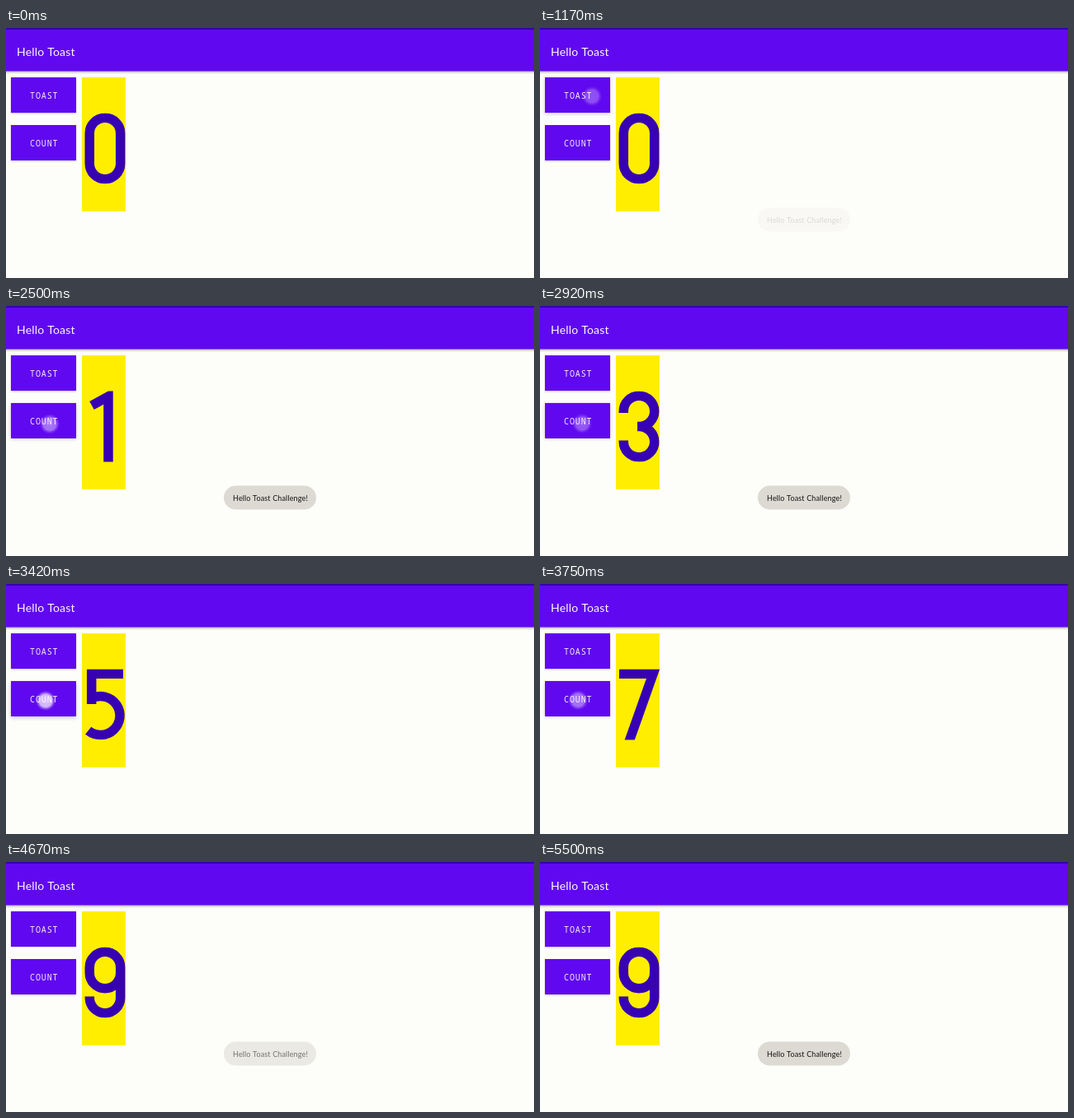
An HTML page with a canvas that plays this animation: 640x304 px, repeating every 5.66 s.

```html
<!DOCTYPE html>
<html lang="en">
<head>
<meta charset="utf-8">
<title>Hello Toast</title>
<style>
  html, body { margin: 0; width: 100%; height: 100%; overflow: hidden; background: #fdfdfa; }
  canvas { display: block; width: 640px; height: 304px; }
</style>
</head>
<body>
<canvas id="stage" width="640" height="304" aria-label="Hello Toast: a counter and a toast message"></canvas>
<script>
const ctx = document.getElementById('stage').getContext('2d');
const LOOP = 5660, STEP = 1000 / 12;
const PAPER = '#fdfdfa', PURPLE = '#6009f0', INK = '#3700b3';

// Centre lines of the counter's digits, drawn with one thick stroke
const NINE = 'M101.3 128a18.7 18.7 0 0 1 37.4 0V135a18.7 18.7 0 0 1 -37.4 0Z' +
             'M138.7 128V165a18.7 18.7 0 0 1 -37.4 0V163.5';
const DIGITS = [
  'M101.3 128a18.7 18.7 0 0 1 37.4 0V165a18.7 18.7 0 0 1 -37.4 0Z',
  'M104 121L124 110V200',
  'M101.3 130V128a18.7 18.7 0 0 1 34.2 10.4L103 183.7H144.5',
  'M101.3 130V128a18.7 18.7 0 1 1 18.7 18.6H118M118 146.4H120a18.7 18.7 0 1 1 -18.7 18.6V163.5',
  'M129 98L102 170.5H144.5M131 143V189.5',
  'M142 109.3H103.7V146M103.8 139.1A23.5 23.5 0 1 1 99.7 178.3',
  NINE,
  'M96 109.3H137L105 200',
  'M120 109.3a18.6 18.6 0 0 1 0 37.2a18.6 18.6 0 0 1 0 -37.2ZM120 146.5a18.6 18.6 0 0 1 0 37.2a18.6 18.6 0 0 1 0 -37.2Z',
  NINE
].map(d => new Path2D(d));

// Taps: press time, release time, position
const toastTaps = [
  { down: 900, up: 1100, x: 63, y: 83 },
  { down: 4250, up: 4470, x: 62, y: 83 }
];
const countTaps = Array.from({ length: 9 }, (_, i) => {
  const up = 2455 + 200 * i;
  return { down: up - 130, up, x: 53 - i, y: 143.5 - i / 3 };
});

const clamp = v => Math.max(0, Math.min(1, v));
const ramp = (t, a, b) => clamp((t - a) / (b - a));
const touch = (tap, t, fade) => Math.min(ramp(t, tap.down, tap.down + 50), 1 - ramp(t, tap.up, tap.up + fade));

function rect(x, y, w, h, color) {
  ctx.fillStyle = color;
  ctx.fillRect(x, y, w, h);
}

function text(str, x, y, font, color, spacing) {
  ctx.font = font;
  ctx.letterSpacing = spacing + 'px';
  ctx.fillStyle = color;
  ctx.fillText(str, x, y);
}

function bar() {
  const shade = ctx.createLinearGradient(0, 52, 0, 56);
  shade.addColorStop(0, 'rgba(60,50,70,.35)');
  shade.addColorStop(1, 'rgba(60,50,70,0)');
  rect(0, 52, 640, 4, shade);
  rect(0, 0, 640, 52.5, PURPLE);
  rect(0, 0, 640, 2, INK);
  text('Hello Toast', 13, 34, '14px Lato, sans-serif', '#fbf8ff', 0.2);
}

function button(label, y, taps, t) {
  const press = Math.max(...taps.map(tap => touch(tap, t, 200)));
  ctx.save();
  ctx.shadowColor = 'rgba(60,55,50,.3)';
  ctx.shadowBlur = 2 + 3 * press;
  ctx.shadowOffsetY = 0.5 + press;
  rect(6, y, 79, 43, PURPLE);
  ctx.restore();
  text(label, 29, y + 26, '10px "Noto Sans Mono", monospace', '#f3eaff', 0.9);
  taps.forEach(tap => dot(tap, touch(tap, t, 110)));
}

function dot({ x, y }, alpha) {
  if (!alpha) return;
  const glow = ctx.createRadialGradient(x, y, 0, x, y, 12);
  glow.addColorStop(0, 'rgba(255,250,255,.78)');
  glow.addColorStop(0.65, 'rgba(255,250,255,.7)');
  glow.addColorStop(0.8, 'rgba(255,250,255,.3)');
  glow.addColorStop(1, 'rgba(255,250,255,0)');
  ctx.globalAlpha = alpha;
  rect(x - 12, y - 12, 24, 24, glow);
  ctx.globalAlpha = 1;
}

function counter(n) {
  rect(92, 60, 53, 163, '#ffee00');
  ctx.save();
  ctx.beginPath();
  ctx.rect(95, 103.5, 50, 86);
  ctx.clip();
  if (n === 6) {
    ctx.translate(240, 293);
    ctx.rotate(Math.PI);
  }
  ctx.strokeStyle = INK;
  ctx.lineWidth = 11.5;
  ctx.stroke(DIGITS[n]);
  ctx.restore();
}

function toast(alpha) {
  if (!alpha) return;
  ctx.globalAlpha = alpha;
  ctx.fillStyle = '#dcdad2';
  ctx.beginPath();
  ctx.roundRect(264, 218.5, 112, 29, 14.5);
  ctx.fill();
  text('Hello Toast Challenge!', 275, 237, '9px Lato, sans-serif', '#15140f', 0.15);
  ctx.globalAlpha = 1;
}

function draw(now) {
  const t = Math.floor((now % LOOP + 4) / STEP) * STEP;
  rect(0, 0, 640, 304, PAPER);
  bar();
  counter(countTaps.filter(tap => t >= tap.up).length);
  button('TOAST', 60, toastTaps, t);
  button('COUNT', 118, countTaps, t);
  toast(ramp(t, 1090, 1660) - ramp(t, 2925, 3400) + ramp(t, 4460, 4830));
  requestAnimationFrame(draw);
}

draw(0);
</script>
</body>
</html>
```
